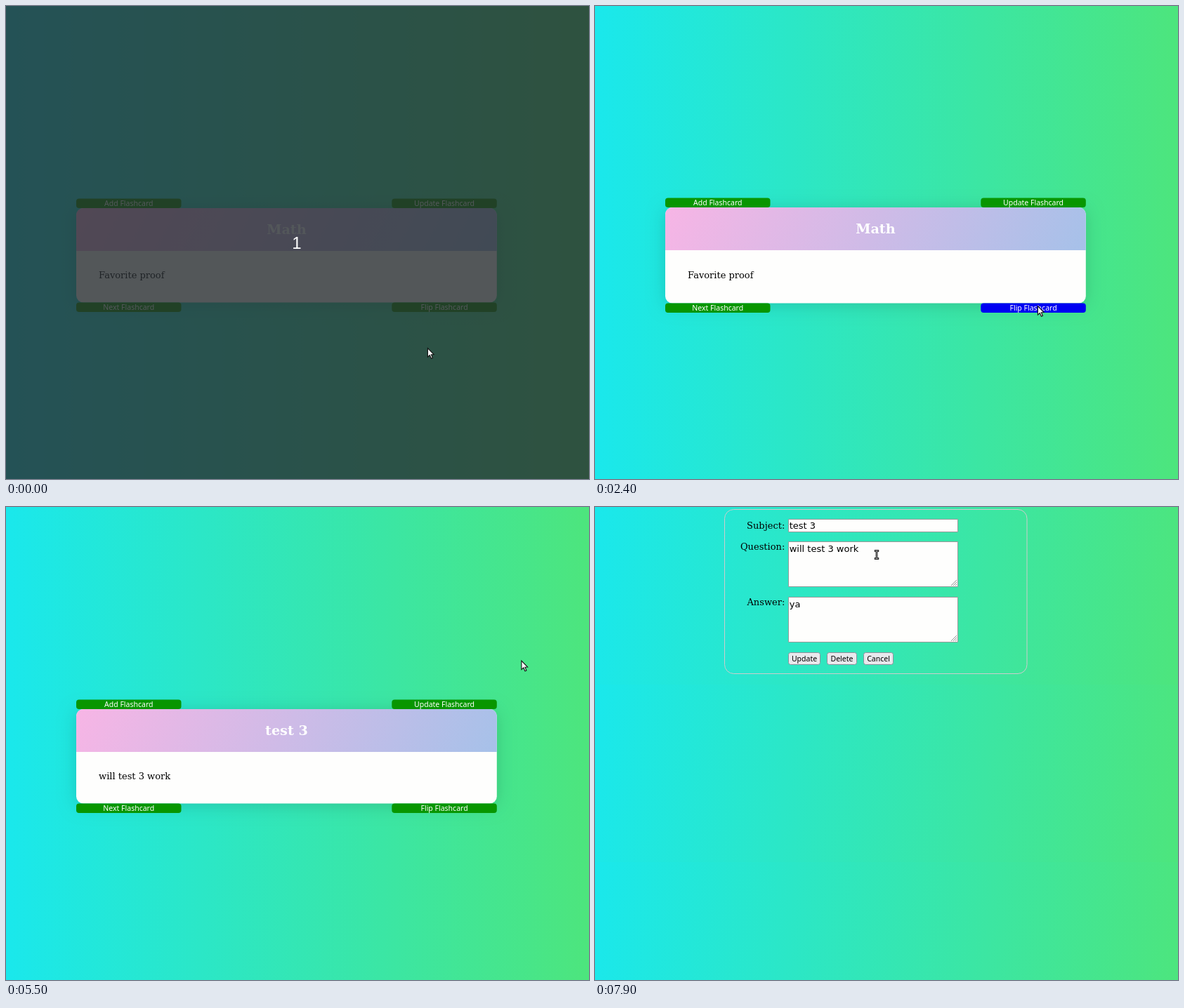
Animation of 830 by 674 pixels, one loop 8 s. Source, as an HTML page with a canvas:

```html
<!DOCTYPE html>
<html lang="en">
<head>
<meta charset="utf-8">
<title>Flashcards</title>
<style>
html, body { margin: 0; width: 100%; height: 100%; overflow: hidden; }
canvas { display: block; }
</style>
</head>
<body>
<canvas id="stage" width="830" height="674"></canvas>
<script>
const W = 830, H = 674, LOOP = 8000, TICK = 100;
const ctx = document.getElementById('stage').getContext('2d');

const SERIF = '13px "DejaVu Serif", serif';
const TITLE = 'bold 19.2px "DejaVu Serif", serif';
const SANS = '13px "DejaVu Sans", sans-serif';
const UI = '10.5px "Noto Sans", sans-serif';
const WHITE = '#fefefd';

// Pointer moves between rests; `via` bends the way there
const REST = [600, 487];
const MOVES = [
  { from: 300, until: 700, to: [630, 427] },
  { from: 3200, until: 4100, to: [251, 427], via: [452, 355] },
  { from: 4200, until: 4300, to: [239, 427] },
  { from: 5200, until: 5500, to: [733.5, 218.5] },
  { from: 5500, until: 6000, to: [650, 279], via: [735, 225] },
  { from: 6000, until: 6200, to: [546, 399] },
  { from: 6200, until: 6500, to: [624, 277] },
  { from: 6900, until: 7500, to: [351, 36], via: [470, 160] },
  { from: 7500, until: 7900, to: [401, 68], via: [370, 31] }
];

const CARDS = [
  { at: 0, title: 'Math', body: 'Favorite proof' },
  { at: 1200, title: 'Favorite proof', math: true },
  { at: 2400, title: 'Math', body: 'Favorite proof' },
  { at: 4500, title: 'test 2', body: 'will test 2 still work when the question is a much longer one' },
  { at: 5200, title: 'test 3', body: 'will test 3 work' }
];

const FIELDS = [
  { label: 'Subject:', value: 'test 3' },
  { label: 'Question:', value: 'will test 3 work', area: true },
  { label: 'Answer:', value: 'ya', area: true }
];
let flow = 17;
for (const f of FIELDS) {
  f.y = flow;
  f.h = f.area ? 64 : 18;
  flow += f.h + (f.area ? 15 : 14);
}

function pointerAt(t) {
  let start = REST;
  for (const { from, until, to, via } of MOVES) {
    if (t <= from) break;
    const k = Math.min(1, (t - from) / (until - from));
    const mid = via ?? start.map((s, i) => (s + to[i]) / 2);
    const at = start.map((s, i) => s * (1 - k) ** 2 + 2 * mid[i] * k * (1 - k) + to[i] * k * k);
    if (k < 1) return { x: at[0], y: at[1] };
    start = to;
  }
  return { x: start[0], y: start[1] };
}

function text(str, x, y, font, color, align = 'left') {
  ctx.font = font;
  ctx.fillStyle = color;
  ctx.textAlign = align;
  ctx.fillText(str, x, y);
}

function box(x, y, w, h, r, fill) {
  ctx.beginPath();
  ctx.roundRect(x, y, w, h, r);
  if (!fill) return;
  ctx.fillStyle = fill;
  ctx.fill();
}

function outline(color, width = 1) {
  ctx.strokeStyle = color;
  ctx.lineWidth = width;
  ctx.stroke();
}

// Gradient over a rectangle, with the angle measured as in CSS
function slope(x, y, w, h, deg, from, to) {
  const a = deg * Math.PI / 180, s = Math.sin(a), c = -Math.cos(a);
  const half = (Math.abs(w * s) + Math.abs(h * c)) / 2;
  const cx = x + w / 2, cy = y + h / 2;
  const g = ctx.createLinearGradient(cx - s * half, cy - c * half, cx + s * half, cy + c * half);
  g.addColorStop(0, from);
  g.addColorStop(1, to);
  return g;
}

function backdrop(tile, deg) {
  for (let y = 0; y < H; y += tile) {
    ctx.fillStyle = slope(0, y, W, tile, deg, '#1ae8ec', '#4de57d');
    ctx.fillRect(0, y, W, tile);
  }
}

function cardButton(label, x, y, p) {
  const w = 149.5, h = 13.5;
  const hot = p.x >= x && p.x < x + w && p.y >= y && p.y < y + h;
  box(x, y, w, h, 4, hot ? '#0000f2' : '#089600');
  text(label, x + w / 2, y + 10.5, UI, '#fff', 'center');
}

function drawCard(t, p) {
  const card = CARDS.findLast(c => c.at <= t);
  const grow = t >= 1300 && t < 2500 ? 1 : 0;
  const x = 100, w = 598.8, headH = 61;
  const top = 288 - grow, bottom = 422.5 + grow, right = x + w - 149.5;

  backdrop(H, 90);
  ctx.save();
  ctx.shadowColor = 'rgba(0,0,0,.15)';
  ctx.shadowBlur = 25;
  ctx.shadowOffsetY = 3;
  box(x, top, w, bottom - top, 10, WHITE);
  ctx.restore();
  box(x, top, w, headH, [10, 10, 0, 0], slope(x, top, w, headH, 118, '#f7b5e5', '#a6c1e9'));

  text(card.title, x + w / 2, top + 37, TITLE, '#fff', 'center');
  if (card.math) {
    text('ax', 132.5, 388, 'italic 17px "Liberation Serif", serif', '#000');
    text('2', 148.5, 383, '11px "Liberation Serif", serif', '#000');
  } else {
    text(card.body, 132, 387.5, SERIF, '#000');
  }

  cardButton('Add Flashcard', x, top - 13.5, p);
  cardButton('Update Flashcard', right, top - 13.5, p);
  cardButton('Next Flashcard', x, bottom, p);
  cardButton('Flip Flashcard', right, bottom, p);
}

function grip(x, y) {
  ctx.beginPath();
  for (let d = 2; d <= 8; d += 3) {
    ctx.moveTo(x - d, y);
    ctx.lineTo(x, y - d);
  }
  outline('#777', .8);
}

function formButton(label, x, w) {
  box(x + .5, 207.5, w - 1, 17, 3, '#e9e9ed');
  outline('#8f8f9d');
  text(label, x + w / 2, 220, UI, '#000', 'center');
}

function drawForm() {
  backdrop(253, 95.2);
  box(184.5, 3.5, 430.5, 234, 13);
  outline('#ccc');

  for (const { label, value, y, h, area } of FIELDS) {
    text(label, 270.3, y + (area ? 12 : 14), SERIF, '#000', 'right');
    box(275.5, y + .5, 241, h, 0, WHITE);
    outline('#999');
    text(value, 276.7, y + (area ? 15 : 14), SANS, '#000');
    if (area) grip(515, y + h - 1);
  }
  formButton('Update', 275, 46);
  formButton('Delete', 330, 43);
  formButton('Cancel', 382, 43);
}

function arrow(p) {
  ctx.save();
  ctx.translate(p.x + .4, p.y + .5);
  ctx.fillStyle = '#fff';
  ctx.fill(ARROW);
  ctx.strokeStyle = '#111';
  ctx.lineWidth = 1.1;
  ctx.stroke(ARROW);
  ctx.restore();
}
const ARROW = new Path2D('M0 0V12.6L2.9 10L5 14.8L7 14L5 9.3L8.7 9.1Z');

function beam(p) {
  ctx.save();
  ctx.translate(p.x, p.y);
  ctx.lineCap = 'square';
  ctx.beginPath();
  for (const y of [-5.5, 5.5]) {
    ctx.moveTo(-1.8, y);
    ctx.lineTo(1.8, y);
  }
  ctx.moveTo(0, -5.5);
  ctx.lineTo(0, 5.5);
  outline('#222', 2.8);
  outline('#a9a9a9', .9);
  ctx.restore();
}

function drawCountdown() {
  ctx.fillStyle = 'rgba(39,45,48,.795)';
  ctx.fillRect(0, 0, W, H);
  text('1', 414, 346, '24px "Liberation Sans", sans-serif', '#fff', 'center');
}

function draw(now) {
  const t = Math.floor((now % LOOP) / TICK) * TICK;
  const p = pointerAt(t);
  const form = t >= 6800;
  if (form) drawForm(); else drawCard(t, p);
  if (t < 100) drawCountdown();

  const overField = form && p.x > 275 && p.x < 516 &&
    FIELDS.some(f => p.y >= f.y && p.y <= f.y + f.h);
  if (overField) beam(p); else arrow(p);
}

let start;
function loop(now) {
  start ??= now;
  draw(Math.max(0, now - start));
  requestAnimationFrame(loop);
}
draw(0);
requestAnimationFrame(loop);
</script>
</body>
</html>
```
